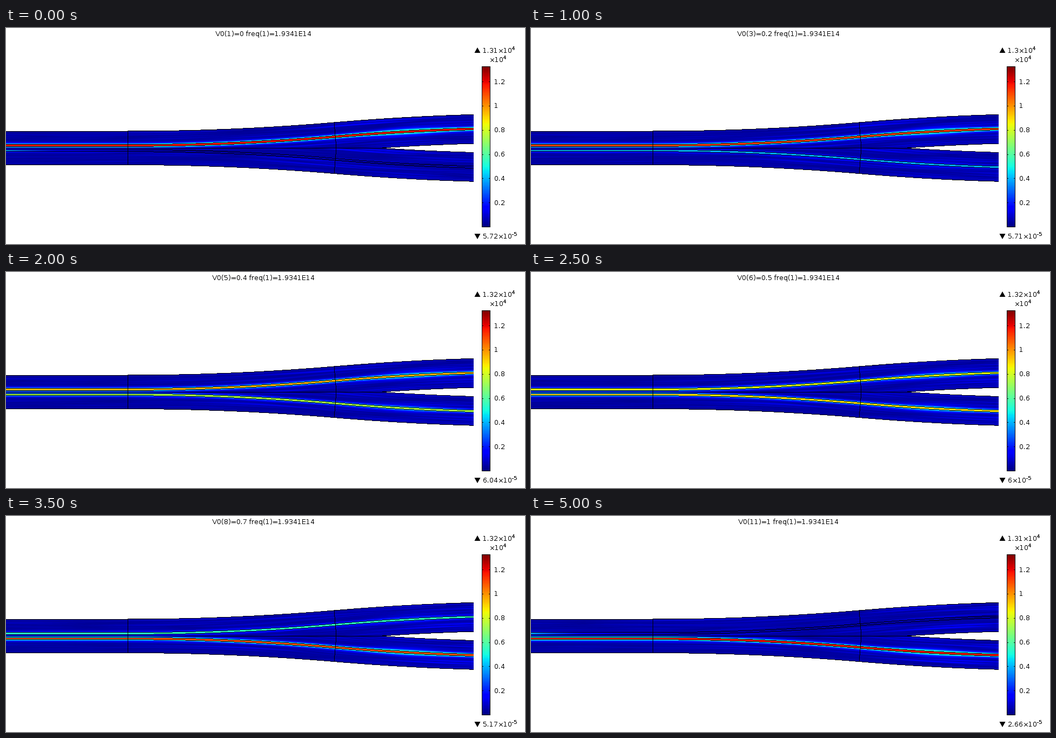
A matplotlib script for the animation above (5.5 s loop, 960 px wide and 400 px high).

```python
import numpy as np
import matplotlib.pyplot as plt
from matplotlib.animation import FuncAnimation
from matplotlib.patches import Polygon

plt.rcParams.update({
    "font.family": "DejaVu Sans",
    "font.size": 10.8,
    "text.hinting": "native",
    "text.hinting_factor": 1,
})

W, H, DPI = 960, 400, 80
PX = 72 / DPI
STEPS, STEP_MS = 11, 500
X_END, Y0, Y1 = 865, 150, 295
MID, CORE, HALF = 222.25, 4.75, 1.75
OUTER, INNER = 26.5, 27.3
BEND, INFLECT, CURV = 225, 610, 1.1e-4
V_MAX = 1.326
PEAK = [1.31, 1.31, 1.3, 1.31, 1.32, 1.32, 1.32, 1.32, 1.32, 1.32, 1.31]
FLOOR = [5.72, 5.7, 5.71, 5.84, 6.04, 6, 5.74, 5.17, 4.47, 3.63, 2.66]
BLACK = (0, 0, 0, 1)


def spread(x):
    """Sideways shift of each arm: two opposite arcs."""
    u = np.clip(x - BEND, 0, INFLECT - BEND)
    v = np.clip(x - INFLECT, 0, None)
    slope = 2 * CURV * (INFLECT - BEND)
    return CURV * u**2 + slope * v - CURV * v**2


xs = np.arange(X_END) + 0.5
ys = np.arange(Y0, Y1) + 0.5
X, Y = np.meshgrid(xs, ys)
arm = CORE + spread(xs)
offset = np.abs(Y - MID) - arm
inside = (offset <= OUTER) & (offset >= -INNER)


def outline():
    """Mask of the one-pixel black edges."""
    mask = np.zeros(X.shape, bool)
    cols = np.arange(X_END)

    def trace(y, keep=slice(None)):
        rows = np.floor(y - Y0).astype(int)
        mask[rows[keep], cols[keep]] = True

    gap = arm - INNER
    for side in (-1, 1):
        for d in (-HALF, HALF, OUTER):
            trace(MID + side * (arm + d))
        trace(MID + side * gap, gap > 0)
    trace(np.full(X_END, MID), gap <= 0)

    rows = np.arange(len(ys))
    tilt = 2 * CURV * (INFLECT - BEND)
    for x in (np.full(len(ys), BEND + 0.5),
              INFLECT + 1 - tilt * np.abs(ys - MID)):
        c = x.astype(int)
        ok = inside[rows, c]
        mask[rows[ok], c[ok]] = True
    return mask


edges = outline()
rng = np.random.default_rng(7)
modes = [(rng.uniform(0.25, 1.3), rng.uniform(-0.02, 0.02),
          rng.uniform(0, 2 * np.pi), rng.uniform(-3, 3)) for _ in range(10)]


def streaks(v):
    along = np.sign(Y - MID) * offset
    n = sum(np.sin(ky * along + kx * X + p + drift * v)
            for ky, kx, p, drift in modes) / np.sqrt(5)
    return 0.03 + 0.03 * np.abs(n) * (0.6 + 0.7 * X / X_END)


def guided(side, amp):
    """Core mode with an evanescent tail, plus a short launch leak."""
    d = np.abs(Y - MID - side * arm)
    amp = np.maximum(amp, 0.36 * np.exp(-X / 120))
    width = 2 + 1.4 * np.exp(-((X - 745) / 70) ** 2)
    tail = 0.65 * np.exp(-np.maximum(d - HALF, 0) / width)
    return amp * np.where(d < HALF, 1, tail)


def picture(v):
    up = 1.17 * np.cos(np.pi / 2 * v)
    low = 1.17 * np.sin(np.pi / 2 * min(v * 1.08, 1))
    field = np.sqrt(guided(-1, up)**2 + guided(1, low)**2 + streaks(v)**2)
    img = plt.cm.jet(np.clip(field / V_MAX, 0, 1))
    img[~inside, 3] = 0
    img[edges] = BLACK
    return img


def color_bar():
    bar = np.repeat(plt.cm.jet(np.linspace(1, 0, 298))[:, None], 16, axis=1)
    bar[[0, -1]] = BLACK
    bar[:, [0, -1]] = BLACK
    for i in range(1, 7):
        row = int(297.5 - 44.8 * i)
        bar[row, [1, 2, -3, -2]] = BLACK
    return bar


fig = plt.figure(figsize=(W / DPI, H / DPI), dpi=DPI, facecolor="white")
ax = fig.add_axes([0, 0, 1, 1])


def attach(base, text, corner, dx, dy, **style):
    """Text placed relative to a corner of another text."""
    ax.annotate(text, xy=corner, xycoords=base, xytext=(dx, dy),
                textcoords="offset pixels", va="baseline", **style)


def power(x, y, exponent):
    base = ax.text(x, y, "×10", va="baseline")
    attach(base, exponent, (1, 0), -1, 8, fontsize=10 * PX)
    return base


plot = ax.imshow(picture(0), extent=(0, X_END, Y1, Y0),
                 interpolation="nearest", aspect="auto")
ax.imshow(color_bar(), extent=(880, 896, 369, 71),
          interpolation="nearest", aspect="auto")
for i in range(1, 7):
    ax.text(903, round(372.5 - 44.8 * i), f"{i / 5:g}", va="baseline")

for y, tip in ((46, 36), (381, 391)):
    ax.add_patch(Polygon([(866.5, y), (877.5, y), (872, tip)],
                         fc="black", ec="none"))

title = ax.text(481, 15, "", ha="center", va="baseline")
attach(title, "V", (0, 0), -9, 3)
power(894, 63, "4")
top = power(882, 46, "4")
bottom = power(882, 390, "-5")

ax.set_xlim(0, W)
ax.set_ylim(H, 0)
ax.axis("off")


def update(i):
    v = i / (STEPS - 1)
    plot.set_data(picture(v))
    title.set_text(f"0({i + 1})={v:g} freq(1)=1.9341E14")
    top.set_text(f"{PEAK[i]:g}×10")
    bottom.set_text(f"{FLOOR[i]:g}×10")
    return plot, title, top, bottom


anim = FuncAnimation(fig, update, frames=STEPS, interval=STEP_MS,
                     init_func=lambda: update(0), repeat=True, repeat_delay=0)
plt.show()
```
